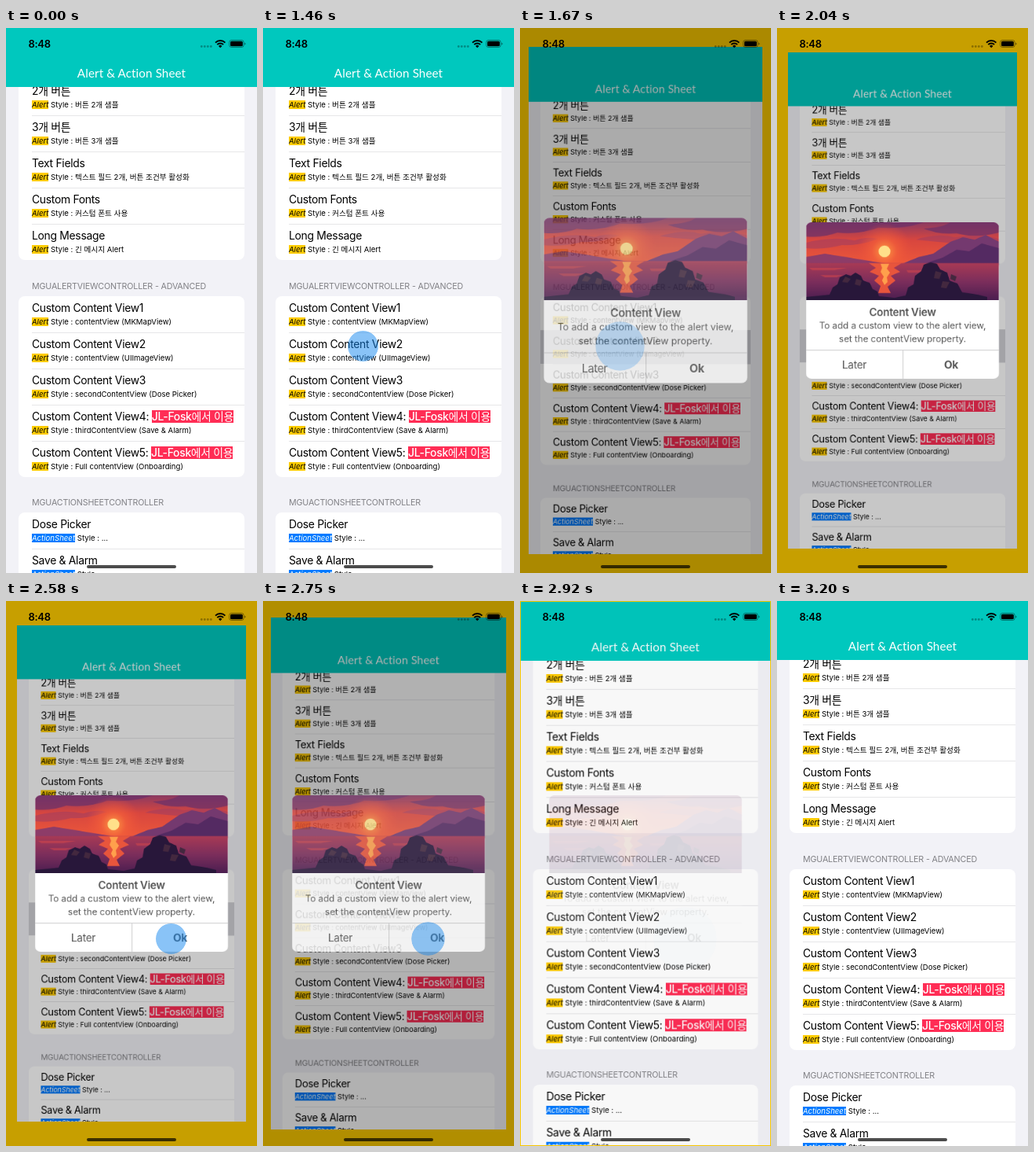
Write an HTML page that moves like this. It is 320 px wide and 693 px high and loops after 3.27 s.

```html
<!DOCTYPE html>
<html lang="ko">
<head>
<meta charset="utf-8">
<title>Alert &amp; Action Sheet</title>
<style>
* { box-sizing: border-box; }
html, body { margin: 0; width: 100%; height: 100%; overflow: hidden; background: #fc0; }
p { margin: 0; }
#stage {
  position: absolute; inset: 0; width: 320px; height: 693px; overflow: hidden;
  background: #fc0; color: #000;
  font-family: Inter, "Noto Sans CJK KR", "Noto Sans CJK", sans-serif;
  white-space: nowrap;
}
#stage > * { position: absolute; }

#page { inset: 0; overflow: hidden; background: #f2f2f7; animation: shrink 3270ms cubic-bezier(.18, 0, .02, 1) infinite; }
#page > * { position: absolute; }
#nav { left: 0; top: 0; width: 320px; height: 75px; background: #00c8be; }
#nav h1 {
  margin: 0; position: absolute; left: 0; top: 45.5px; width: 320px; text-align: center;
  font: 400 15.2px/22px Lato, sans-serif; letter-spacing: .1px; color: #fff;
}
.card { left: 16px; width: 288px; border-radius: 8px; overflow: hidden; background: #fff; }
.row { position: relative; height: 46px; padding: 6px 0 0 17px; }
.row + .row::before {
  content: ""; position: absolute; left: 17px; right: 0; top: -.5px; height: 1px; background: #e6e6e8;
}
.row b, .row small { display: block; position: relative; }
.row b { font-weight: 400; font-size: 13.9px; line-height: 18px; letter-spacing: -.3px; }
.row small { margin-top: 2px; font-size: 9.6px; line-height: 14px; }
.row i { background: #fc0; }
.row i.sheet { background: #007aff; color: #fff; }
.row em { font-style: normal; font-weight: 500; color: #fff; background: #ff2d55; }
.pressed { position: absolute; inset: 0; background: #d1d1d6; animation: press 3270ms step-end infinite; }
.head { left: 33px; font-size: 10.7px; line-height: 14px; letter-spacing: -.16px; color: #808085; }

#dim { inset: 0; background: #000; animation: dim 3270ms linear infinite; }
#alert {
  left: 37px; top: 247px; width: 246px; height: 199px; border-radius: 7px; overflow: hidden;
  background: #fff; color: #555; text-align: center;
  animation: alert 3270ms cubic-bezier(.18, 0, .02, 1) infinite;
}
#alert > * { position: absolute; }
#alert svg { left: 0; top: 0; }
#alert p { left: 0; width: 100%; line-height: 17px; }
#alert .title { top: 106px; font-size: 13.6px; font-weight: 600; letter-spacing: -.3px; }
#alert .text { top: 123px; font-size: 11.7px; letter-spacing: -.05px; }
#alert .button {
  top: 162px; width: 123px; height: 37px; border-top: 1px solid #d4d4d6;
  font-size: 13.6px; line-height: 37px; letter-spacing: -.3px;
}
#alert .ok { left: 123px; border-left: 1px solid #d4d4d6; font-weight: 700; }

.touch {
  width: 39px; height: 39px; margin: -19.5px; border-radius: 50%;
  background: #1286ee; opacity: 0;
}
#tap1 { left: 127px; top: 404.5px; animation: tap1 3270ms ease-in-out infinite; }
#tap2 { left: 210px; top: 429px; animation: tap2 3270ms ease-in-out infinite; }
#time { left: 28.5px; top: 12px; font-size: 13px; font-weight: 600; line-height: 17px; letter-spacing: -.3px; }
#icons { left: 244px; top: 10px; }
#home { left: 103px; top: 682.5px; width: 114px; height: 4.3px; border-radius: 3px; background: #000; opacity: .7; }

@keyframes shrink {
  0%, 47.58% { transform: none; }
  57.06%, 82.81% { transform: scale(.91); }
  92.29%, 100% { transform: none; }
}
/* darkest while the page is moving */
@keyframes dim {
  0%, 47.58% { opacity: 0; }
  51.07% { opacity: .33; }
  58%, 82.81% { opacity: .22; }
  84.1% { opacity: .31; }
  86.54% { opacity: .05; }
  92.29%, 100% { opacity: 0; }
}
@keyframes alert {
  0%, 47.58% { opacity: 0; transform: scale(1.24); }
  57.06% { opacity: 1; transform: none; }
  82.57% { opacity: 1; transform: none; animation-timing-function: ease; }
  93.7%, 100% { opacity: 0; transform: none; }
}
@keyframes press {
  0% { opacity: 0; }
  47.58% { opacity: 1; }
  82.57%, 100% { opacity: 0; }
}
@keyframes tap1 {
  0% { opacity: 0; animation-timing-function: step-end; }
  44.6%, 47.09% { opacity: .5; transform: none; }
  54.74%, 100% { opacity: 0; transform: scale(2.1); }
}
@keyframes tap2 {
  0% { opacity: 0; animation-timing-function: step-end; }
  78.87%, 82.57% { opacity: .5; transform: none; }
  90.21%, 100% { opacity: 0; transform: scale(2.1); }
}
</style>
</head>
<body>
<div id="stage">
  <div id="page">
    <div class="card" style="top:65px">
      <div class="row"><b>2개 버튼</b><small><i>Alert</i> Style : 버튼 2개 샘플</small></div>
      <div class="row"><b>3개 버튼</b><small><i>Alert</i> Style : 버튼 3개 샘플</small></div>
      <div class="row"><b>Text Fields</b><small><i>Alert</i> Style : 텍스트 필드 2개, 버튼 조건부 활성화</small></div>
      <div class="row"><b>Custom Fonts</b><small><i>Alert</i> Style : 커스텀 폰트 사용</small></div>
      <div class="row"><b>Long Message</b><small><i>Alert</i> Style : 긴 메시지 Alert</small></div>
    </div>
    <p class="head" style="top:322px">MGUALERTVIEWCONTROLLER - ADVANCED</p>
    <div class="card" style="top:341px">
      <div class="row"><b>Custom Content View1</b><small><i>Alert</i> Style : contentView (MKMapView)</small></div>
      <div class="row"><div class="pressed"></div><b>Custom Content View2</b><small><i>Alert</i> Style : contentView (UIImageView)</small></div>
      <div class="row"><b>Custom Content View3</b><small><i>Alert</i> Style : secondContentView (Dose Picker)</small></div>
      <div class="row"><b>Custom Content View4: <em>JL-Fosk에서 이용</em></b><small><i>Alert</i> Style : thirdContentView (Save &amp; Alarm)</small></div>
      <div class="row"><b>Custom Content View5: <em>JL-Fosk에서 이용</em></b><small><i>Alert</i> Style : Full contentView (Onboarding)</small></div>
    </div>
    <p class="head" style="top:597px">MGUACTIONSHEETCONTROLLER</p>
    <div class="card" style="top:616px">
      <div class="row"><b>Dose Picker</b><small><i class="sheet">ActionSheet</i> Style : ...</small></div>
      <div class="row"><b>Save &amp; Alarm</b><small><i class="sheet">ActionSheet</i> Style : ...</small></div>
    </div>
    <div id="nav"><h1>Alert &amp; Action Sheet</h1></div>
  </div>
  <div id="dim"></div>

  <div id="alert">
    <svg width="246" height="99" viewBox="0 0 246 99">
      <defs>
        <linearGradient id="sky" x2="0" y2="1">
          <stop offset="0" stop-color="#8a3a62"/><stop offset=".4" stop-color="#d8463f"/><stop offset="1" stop-color="#ee5a3a"/>
        </linearGradient>
        <linearGradient id="sea" x2="0" y2="1">
          <stop offset="0" stop-color="#a83a55"/><stop offset=".5" stop-color="#7c2e5c"/><stop offset="1" stop-color="#4b1e50"/>
        </linearGradient>
        <radialGradient id="glow">
          <stop offset="0" stop-color="#ffa045"/><stop offset=".45" stop-color="#f4603a" stop-opacity=".7"/><stop offset="1" stop-color="#f0503a" stop-opacity="0"/>
        </radialGradient>
      </defs>
      <path fill="url(#sky)" d="M0 0h246v56H0z"/>
      <path fill="#6d3068" opacity=".75" d="M0 0h150q-22 9-58 7-24 9-52 6-18 7-40 5zM246 0v13q-30 8-54 1-24 2-42-6 24-1 34-8z"/>
      <path fill="#a33f60" opacity=".6" d="M0 26q34-9 62-3 14-5 30-2-24 9-46 8-22 6-46 4zM140 22q28-9 50-3 30-5 56 2v5q-50 3-106-4z"/>
      <circle cx="100" cy="37" r="36" fill="url(#glow)"/>
      <circle cx="100" cy="37" r="7.5" fill="#ffe08a"/>
      <path fill="#8d3c68" d="M0 44l24-4 26 4 30 5 26 4H0z"/>
      <path fill="#74396f" d="M122 53l22-9 18-4 22-15 16-6 15 3 14-6 17 9v30z"/>
      <path fill="#542a62" d="M150 53l24-8 18-10 16 2 16-10 22 6v21z"/>
      <path fill="url(#sea)" d="M0 52h246v47H0z"/>
      <path fill="#e8553c" d="M80 52h42l-10 6 8 5-12 5 6 6-10 8 4 8H92l3-9-8-7 6-6-12-5 8-5z"/>
      <path fill="#ffa04c" d="M95 53h11l-3 6 4 5-4 6 1 6-4 4-3-6 2-5-4-6 2-5z"/>
      <path fill="#d9484a" opacity=".5" d="M4 58h48l-16 3H8zM18 67h30l-9 3H24zM128 61h34l-12 3h-20z"/>
      <path fill="#28173a" d="M0 95l30-3 4-9 6-4 3-9 8-4 6 2 6-4 7 4 3 6 8 3 4 8 6 3 2 6 20 2 14-3 3-10 7-4 2-11 8-6 3-8 9-3 8 2 4 7 9 4 3 10 10 4 6 11 20 3 12 3v6H0z"/>
      <path fill="#43283f" d="M50 69l7 3-4 5-7-1zM64 72l7 2-2 7-7-2zM165 62l8 2-3 8-7-1zM174 75l9 1-4 8-7-1zM185 66l7 3-2 6-6-3z"/>
    </svg>
    <p class="title">Content View</p>
    <p class="text">To add a custom view to the alert view,<br>set the contentView property.</p>
    <div class="button">Later</div>
    <div class="button ok">Ok</div>
  </div>

  <div class="touch" id="tap1"></div>
  <div class="touch" id="tap2"></div>
  <div id="time">8:48</div>
  <svg id="icons" width="64" height="20">
    <g opacity=".3"><circle cx="5.3" cy="13.5" r="1.4"/><circle cx="9.3" cy="13.5" r="1.4"/><circle cx="13.3" cy="13.5" r="1.4"/><circle cx="17.3" cy="13.5" r="1.4"/></g>
    <path fill="none" stroke="#000" stroke-width="1.9" d="M23 8.6a8.6 8.6 0 0 1 12.4 0M25.3 11.2a5.4 5.4 0 0 1 7.8 0"/>
    <path d="M29.2 15.2l-2.2-2.3a3.1 3.1 0 0 1 4.4 0z"/>
    <rect x="40.7" y="5.5" width="18.4" height="9" rx="2.6" fill="none" stroke="#000" stroke-opacity=".4"/>
    <rect x="42" y="6.8" width="15.8" height="6.4" rx="1.5"/>
    <path fill-opacity=".45" d="M60.2 8.4q1.4 .5 1.4 1.6t-1.4 1.6z"/>
  </svg>
  <div id="home"></div>
</div>
</body>
</html>
```
